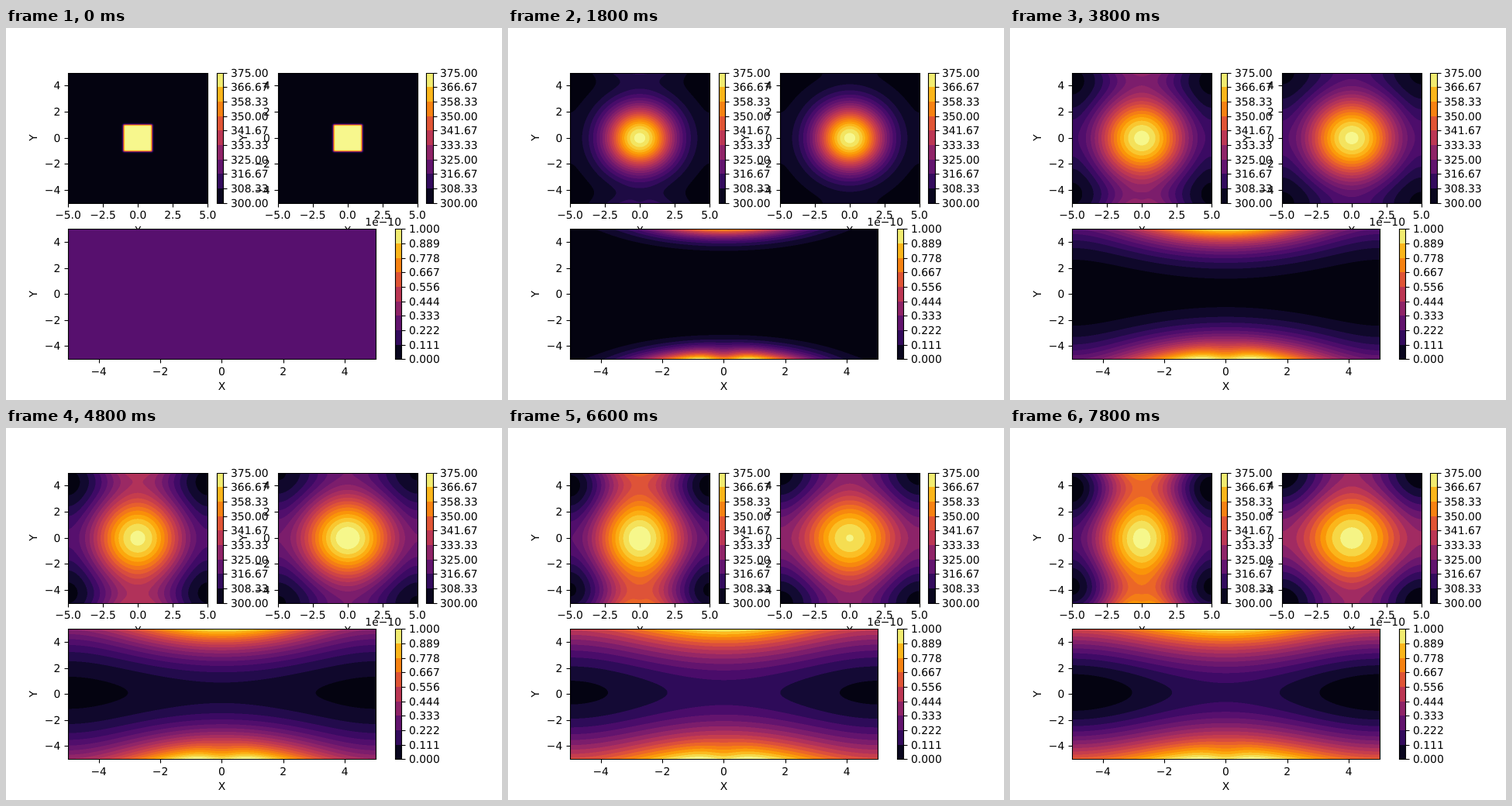
Animation, 640 px wide and 480 px high, one loop 8000 ms. Source, as an HTML page with a canvas:

```html
<!DOCTYPE html>
<html lang="en">
<head>
<meta charset="utf-8">
<title>Heat maps</title>
<style>
  html, body { margin: 0; width: 100%; height: 100%; overflow: hidden; background: #fff; }
  canvas, svg { position: absolute; left: 0; top: 0; }
  text { font: 13.89px "DejaVu Sans", sans-serif; fill: #000; text-rendering: geometricPrecision; }
  path { fill: none; stroke: #000; stroke-width: 1.11; }
</style>
</head>
<body>
<canvas id="stage" width="640" height="480"></canvas>
<svg id="axes" width="640" height="480" viewBox="0 0 640 480">
  <clipPath id="above"><rect width="640" height="259"/></clipPath>
</svg>
<script>
const STEP_MS = 200, STEPS = 40;
const ctx = document.getElementById('stage').getContext('2d');
const svg = document.getElementById('axes');

const stops = ('000004 07051b 160b39 2b0b57 420a68 57106e 6a176e 7f1e6c 932667 a82e5f bc3754 ' +
  'cc4248 dd513a ea632a f37819 f98e09 fca50a fbbe23 f6d746 f1ef75 fcffa4').split(' ')
  .map(h => [0, 2, 4].map(i => parseInt(h.slice(i, i + 2), 16)));

function inferno(v) {
  const p = Math.min(Math.max(v, 0), 1) * (stops.length - 1);
  const i = Math.min(Math.floor(p), stops.length - 2);
  return stops[i].map((c, k) => Math.round(c + (stops[i + 1][k] - c) * (p - i)));
}
const css = v => `rgb(${inferno(v)})`;
const snap = v => Math.floor(v + 0.5) + 0.5;

// ---- axes ----
function add(tag, attrs, text = '') {
  const el = document.createElementNS('http://www.w3.org/2000/svg', tag);
  for (const k in attrs) el.setAttribute(k, attrs[k]);
  el.textContent = text;
  svg.append(el);
}
const label = (x, y, text, anchor = 'middle', more = {}) =>
  add('text', { x, y: Math.round(y), 'text-anchor': anchor, ...more }, text);
const line = d => add('path', { d });
const signed = s => s.replace('-', '\u2212');
const frame = (l, t, r, b) => line(`M${snap(l)} ${snap(t)}H${snap(r)}V${snap(b)}H${snap(l)}Z`);

function drawAxes(p) {
  const { l, t, r, b } = p, cy = (t + b) / 2, cx = (l + r) / 2;
  for (const v of p.ticks) {
    const x = l + (v + 5) / 10 * (r - l);
    line(`M${snap(x)} ${snap(b)}v5`);
    label(x, b + 20.5, signed(v.toFixed(p.digits)));
  }
  for (let v = -4; v <= 4; v += 2) {
    const y = cy - v * (b - t) / 10;
    line(`M${snap(l)} ${snap(y)}h-5`);
    label(l - 9.7, y + 5, signed(String(v)), 'end');
  }
  frame(l, t, r, b);
  label(cx, b + 39.9, 'X', 'middle', p.cut ? { 'clip-path': 'url(#above)' } : {});
  const yx = Math.round(l - 40);
  label(0, 0, 'Y', 'middle', { transform: `translate(${yx} ${cy}) rotate(-90)` });
}

function drawBar(p) {
  const { t, b } = p, l = p.bar, r = l + 8.4, h = (b - t) / 9;
  for (let i = 0; i < 9; i++) {
    const top = Math.round(b - (i + 1) * h);
    add('rect', { x: Math.round(l), y: top, width: Math.round(r) - Math.round(l),
      height: Math.round(b - i * h) - top, fill: css((i + 0.5) / 9) });
  }
  for (let i = 0; i < 10; i++) {
    const y = b - i * h;
    line(`M${snap(r)} ${snap(y)}h5`);
    label(Math.round(r + 9.7), y + 5, (p.lo + (p.hi - p.lo) * i / 9).toFixed(p.places), 'start');
  }
  frame(l, t, r, b);
}

const small = { t: 57.6, b: 225.6, ticks: [-5, -2.5, 0, 2.5, 5], digits: 1, cut: true,
  lo: 300, hi: 375, places: 2 };
const panels = [
  { ...small, l: 80, r: 260.36, bar: 271.6 },
  { ...small, l: 350.55, r: 530.9, bar: 542.2 },
  { l: 80, t: 259.2, r: 476.8, b: 427.2, ticks: [-4, -2, 0, 2, 4], digits: 0,
    lo: 0, hi: 1, places: 3, bar: 501.6 }
];
for (const p of panels) { drawAxes(p); drawBar(p); }
label(510, 255, '1e\u221210', 'end');

// ---- fields ----
function erf(x) {
  const a = Math.abs(x), k = 1 / (1 + 0.3275911 * a);
  const poly = k * (0.254829592 + k * (-0.284496736 + k * (1.421413741 +
    k * (-1.453152027 + k * 1.061405429))));
  return Math.sign(x) * (1 - poly * Math.exp(-a * a));
}

// A box spreading between two insulated walls at -5 and 5.
const HALF = 1.027;
function spread(x, variance) {
  const w = Math.sqrt(2 * variance);
  let sum = 0;
  for (let m = -2; m <= 2; m++) {
    const c = x + 10 * m;
    sum += (erf((HALF + c) / w) + erf((HALF - c) / w)) / 2;
  }
  return sum;
}

// Profile of a steady inflow at depth z, 1 at the wall itself.
const inflow = z => Math.exp(-z * z) - Math.sqrt(Math.PI) * z * (1 - erf(z));

// Heat also enters from the lower and upper walls, less so around x = 0.
function makeFields(n, xs, ys) {
  const variance = 0.003 + 0.311 * n;
  const fx = xs.map(x => spread(x, variance));
  const fy = ys.map(y => spread(y, variance));
  const f0 = spread(0, variance);
  const bias = 0.1 - 0.57 * Math.max(0, 1 - (n / 18) ** 2);
  const reach = 0.172 * n + 1e-6;
  const wall = d => inflow(d / reach) + inflow((20 - d) / reach);
  const gain = n ? (1.35 + 1.6 * Math.exp(-n / 13)) / f0 : 0;
  const topGain = n ? Math.max(0, 1 - 2.6 / n) : 0;
  const notch = n ? Math.min(0.9, 2.8 / n) : 0;
  const low = ys.map(y => wall(5 + y));
  const high = ys.map(y => topGain * wall(5 - y));
  const nx = xs.map(x => notch * Math.exp(-x * x / 0.35));
  const ny = ys.map(y => Math.exp(-(((5 + y) / 1.2) ** 2)));
  const plain = (i, j) => 75 * fx[i] * fy[j] + bias;
  const extra = (i, j) => gain * fx[i] * (high[j] + low[j] * (1 - nx[i] * ny[j]));
  return [(i, j) => plain(i, j) + extra(i, j), plain, extra];
}

function niceStep(range) {
  const raw = range / 20, unit = 10 ** Math.floor(Math.log10(raw));
  return unit * [1, 1.5, 2, 2.5, 3, 4, 5, 6, 8, 10].find(s => s * unit >= raw * 0.9999);
}

// Each panel is computed at double size and scaled down for smooth band edges.
for (const p of panels) {
  p.x = Math.round(p.l); p.y = Math.round(p.t);
  p.w = Math.round(p.r) - p.x; p.h = Math.round(p.b) - p.y;
  p.buf = document.createElement('canvas');
  p.buf.width = p.w * 2; p.buf.height = p.h * 2;
  p.pen = p.buf.getContext('2d');
  p.img = p.pen.createImageData(p.w * 2, p.h * 2);
  p.xs = Array.from({ length: p.w * 2 }, (_, i) => (i + 0.5) / (p.w * 2) * 10 - 5);
  p.ys = Array.from({ length: p.h * 2 }, (_, j) => 5 - (j + 0.5) / (p.h * 2) * 10);
  p.vals = new Float64Array(p.w * p.h * 4);
}

function paint(p, field) {
  const W = p.w * 2, H = p.h * 2;
  let min = Infinity, max = -Infinity;
  for (let j = 0, k = 0; j < H; j++) {
    for (let i = 0; i < W; i++, k++) {
      const v = p.vals[k] = field(i, j);
      if (v < min) min = v;
      if (v > max) max = v;
    }
  }
  if (max - min < 1e-9) {
    ctx.fillStyle = css(0.25);
    ctx.fillRect(p.x, p.y, p.w, p.h);
    return;
  }
  const step = niceStep(max - min);
  const base = Math.floor(min / step), count = Math.ceil(max / step) - base;
  const bands = Array.from({ length: count }, (_, i) => inferno((i + 0.5) / count));
  const px = p.img.data;
  for (let k = 0; k < p.vals.length; k++) {
    const band = Math.min(count - 1, Math.max(0, Math.floor(p.vals[k] / step) - base));
    const c = bands[band];
    px[k * 4] = c[0]; px[k * 4 + 1] = c[1]; px[k * 4 + 2] = c[2]; px[k * 4 + 3] = 255;
  }
  p.pen.putImageData(p.img, 0, 0);
  ctx.drawImage(p.buf, p.x, p.y, p.w, p.h);
}

let shown = -1;
function tick() {
  const n = Math.floor(performance.now() / STEP_MS) % STEPS;
  if (n !== shown) {
    shown = n;
    panels.forEach((p, k) => paint(p, makeFields(n, p.xs, p.ys)[k]));
  }
  requestAnimationFrame(tick);
}
tick();
</script>
</body>
</html>
```
